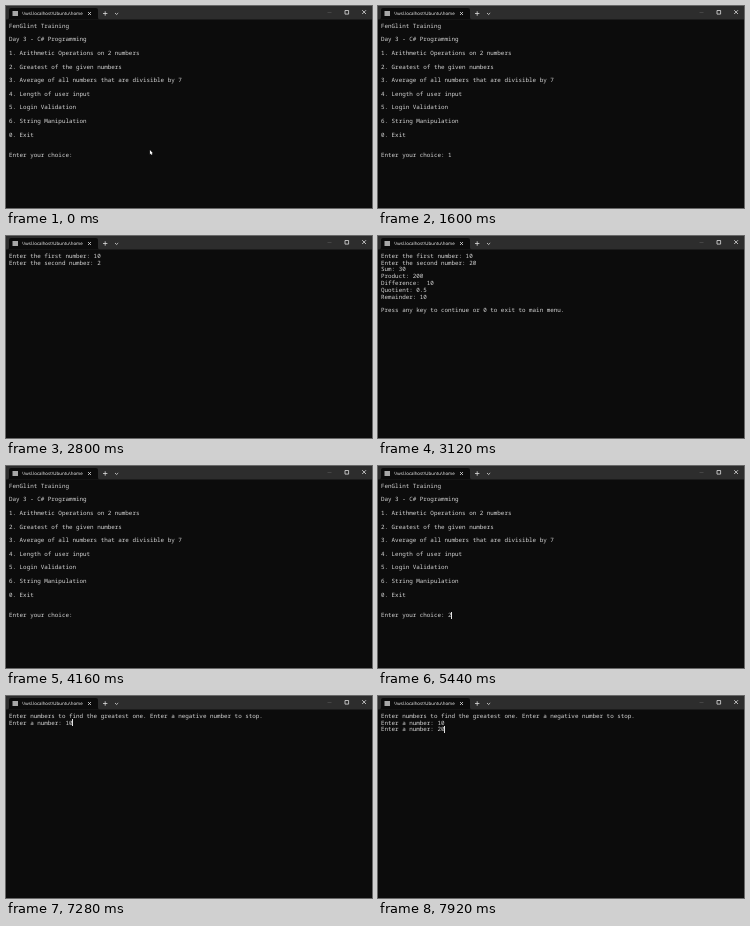
Animation of 366 by 202 pixels, one loop 8 s. Source, as an HTML page:

```html
<!DOCTYPE html>
<html lang="en">
<head>
<meta charset="utf-8">
<title>Terminal session</title>
<style>
  html, body { margin: 0; width: 100%; height: 100%; overflow: hidden; background: #0c0c0c; }
  svg { display: block; width: 100vw; height: 100vh; }
  text { white-space: pre; text-rendering: geometricPrecision; }
  #screen { font: 5.89px "Noto Sans Mono", monospace; fill: #d6d6d6; }
  #title { font: 4.45px "Open Sans", sans-serif; fill: #fff; }
  .icons { fill: none; stroke: #ddd; stroke-width: .8; }
</style>
</head>
<body>
<svg viewBox="0 0 366 202">
  <rect width="366" height="13.5" fill="#2d2d2d"/>
  <path d="M1 13.5Q3 13.5 3 11.5V4Q3 2 5 2H90Q92 2 92 4V11.5Q92 13.5 94 13.5Z" fill="#0c0c0c"/>
  <rect x="6.5" y="5" width="5.5" height="5" fill="#a8a8a8"/>
  <text id="title" x="16" y="9.4">\\wsl.localhost\Ubuntu\home</text>
  <g class="icons">
    <path d="M82 6l3 3m0-3l-3 3M97 7.5h4.4m-2.2-2.2v4.4M109 7l1.6 1.5L112.2 7"/>
    <path d="M321.5 6.5h4" stroke="#4c4c4c"/>
    <path d="M339 4.5h3.6v3.6H339zM356.2 4.2l3.8 3.8m0-3.8l-3.8 3.8"/>
  </g>
  <g id="screen"></g>
  <rect id="caret" width="1" height="7" fill="#e4e4e4"/>
  <path id="pointer" d="M143.9 144v4.4l1-.9.7 1.4.7-.4-.6-1.3h1.2z" fill="#fff"/>
</svg>
<script>
const LOOP = 8000, LEFT = 3, CHAR = 3.535, LINE = 6.8;
const [screen, caret, pointer] = ["screen", "caret", "pointer"].map(id => document.getElementById(id));

const menu = [
  "FenGlint Training",
  "Day 3 - C# Programming",
  "1. Arithmetic Operations on 2 numbers",
  "2. Greatest of the given numbers",
  "3. Average of all numbers that are divisible by 7",
  "4. Length of user input",
  "5. Login Validation",
  "6. String Manipulation",
  "0. Exit"
].join("\n\n") + "\n\n\nEnter your choice: ";
const first = "Enter the first number: ";
const second = first + "10\nEnter the second number: ";
const results = second + `20
Sum: 30
Product: 200
Difference:  10
Quotient: 0.5
Remainder: 10

Press any key to continue or 0 to exit to main menu.`;
const greatest = `Enter numbers to find the greatest one. Enter a negative number to stop.
Enter a number: `;
const next = greatest + "10\nEnter a number: ";

// [start time, screen text, caret visible]
const states = [
  [0, menu, false],
  [1280, menu + "1", true],
  [1600, menu + "1", false],
  [1680, first, false],
  [2240, first + "1", true],
  [2320, first + "10", false],
  [2560, second, true],
  [2800, second + "2", false],
  [2960, second + "20", true],
  [3120, results, false],
  [4160, menu, false],
  [5440, menu + "2", true],
  [5600, greatest, true],
  [6160, greatest, false],
  [6240, greatest + "1", false],
  [7280, greatest + "10", true],
  [7600, next, true],
  [7760, next + "2", false],
  [7920, next + "20", true]
];

function show([start, content, caretOn]) {
  const lines = content.split("\n");
  screen.replaceChildren(...lines.map((line, row) => {
    const text = document.createElementNS("http://www.w3.org/2000/svg", "text");
    text.setAttribute("x", LEFT);
    text.setAttribute("y", 21.8 + row * LINE);
    text.textContent = line;
    return text;
  }));
  const row = lines.length - 1;
  caret.setAttribute("x", Math.floor(LEFT + lines[row].length * CHAR));
  caret.setAttribute("y", Math.floor(16.85 + row * LINE));
  caret.style.display = caretOn ? "" : "none";
  pointer.style.display = start === 0 ? "" : "none";
}

let current;
function frame() {
  const time = performance.now() % LOOP;
  const state = states.findLast(([start]) => start <= time);
  if (state !== current) show(current = state);
  requestAnimationFrame(frame);
}
frame();
</script>
</body>
</html>
```
